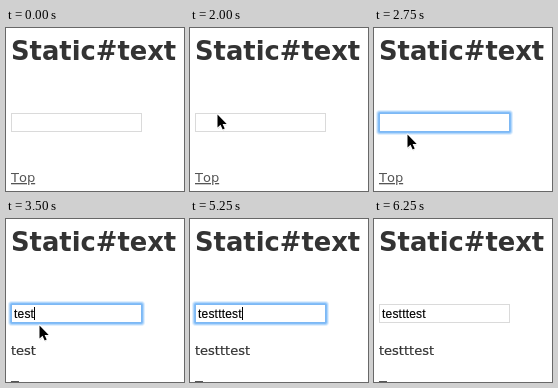
An HTML page that plays this animation: 178 by 163 pixels, repeating every 6500 ms.

```html
<!DOCTYPE html>
<html lang="en">
<head>
<meta charset="utf-8">
<title>Static text</title>
<style>
  html, body { margin: 0; width: 100%; height: 100%; overflow: hidden; background: #fff; }
  svg { display: block; width: 178px; height: 163px; }
  text { font: 13px "DejaVu Sans", sans-serif; font-kerning: none; white-space: pre; fill: #333; }
  .title { font-size: 25.8px; font-weight: bold; }
  .echo { stroke: #333; stroke-width: .2px; }
  .typed { font: 12px "Liberation Sans", Arial, sans-serif; letter-spacing: .2px; fill: #000; stroke: #000; stroke-width: .15px; }
  .link { fill: #555; text-decoration: underline; text-decoration-skip-ink: none; }
</style>
</head>
<body>
<svg viewBox="0 0 178 163">
  <text class="title" x="5" y="32">Static#text</text>
  <g id="ring">
    <rect x="2" y="82" width="137" height="25" rx="4" fill="#e0effd"/>
    <rect x="3" y="83" width="135" height="23" rx="3" fill="#b3d7fb"/>
    <rect x="4" y="84" width="133" height="21" rx="2" fill="#84bef8"/>
  </g>
  <rect id="field" x="5.5" y="85.5" width="130" height="18" fill="#fff"/>
  <text id="value" class="typed" x="8" y="99"></text>
  <rect id="caret" y="88" width="1" height="13"/>
  <text id="echo" class="echo" x="5" y="136"></text>
  <text id="link" class="link" x="5" y="154">Top</text>
  <g id="pointer">
    <path d="M2 3v13l3-2.8 2.2 4.4 2-.9-2-4.5h4z" opacity=".2"/>
    <path d="M1.5 1.5v13l3-2.8 2.2 4.8 2-.9-2.1-4.7h4.1z" stroke="#fff" stroke-width="1.8"
      stroke-linejoin="round" paint-order="stroke"/>
  </g>
</svg>
<script>
const LOOP = 6500, TICK = 250, BLINK = 500;
const ENTER = 500, FOCUS = 2250, TYPE = 3000, TYPED = 5000, LEAVE = 5250, BLUR = 6250;

// One entry per tick: pointer stops, and keys pressed
const path = [[16, 74], [3, 42], [2, 34], [3, 18], [7, 16], [9, 35], [26, 85], [26, 85], [26, 93], [32, 105]];
const keys = ["t", "e", "st", "", "t", "t", "e", "s", "t"];

const [ring, field, value, caret, echo, link, pointer] =
  ["ring", "field", "value", "caret", "echo", "link", "pointer"].map(id => document.getElementById(id));

const show = (el, on) => el.setAttribute("visibility", on ? "visible" : "hidden");
const ticksSince = (t, from) => Math.max(0, Math.floor((t - from) / TICK));

function draw(t) {
  const focused = t >= FOCUS && t < BLUR;
  const typing = t >= TYPE;

  const [x, y] = path[Math.min(ticksSince(t, ENTER), path.length - 1)];
  pointer.setAttribute("transform", `translate(${x} ${y})`);
  show(pointer, t >= ENTER && t < LEAVE);

  const word = typing ? keys.slice(0, ticksSince(t, TYPE) + 1).join("") : "";
  value.textContent = echo.textContent = word;
  link.setAttribute("y", typing ? 171 : 154);

  show(ring, focused);
  field.setAttribute("stroke", focused ? "#7db8f4" : "#dadada");

  // The blink restarts at focus and with every key
  const active = typing ? Math.min(t, TYPED) : FOCUS;
  caret.setAttribute("x", Math.floor(8.2 + value.getComputedTextLength()));
  show(caret, focused && Math.floor((t - active) / BLINK) % 2 === 0);
}

const start = performance.now();
function frame() {
  draw((performance.now() - start) % LOOP);
  requestAnimationFrame(frame);
}
draw(0);
requestAnimationFrame(frame);
</script>
</body>
</html>
```
